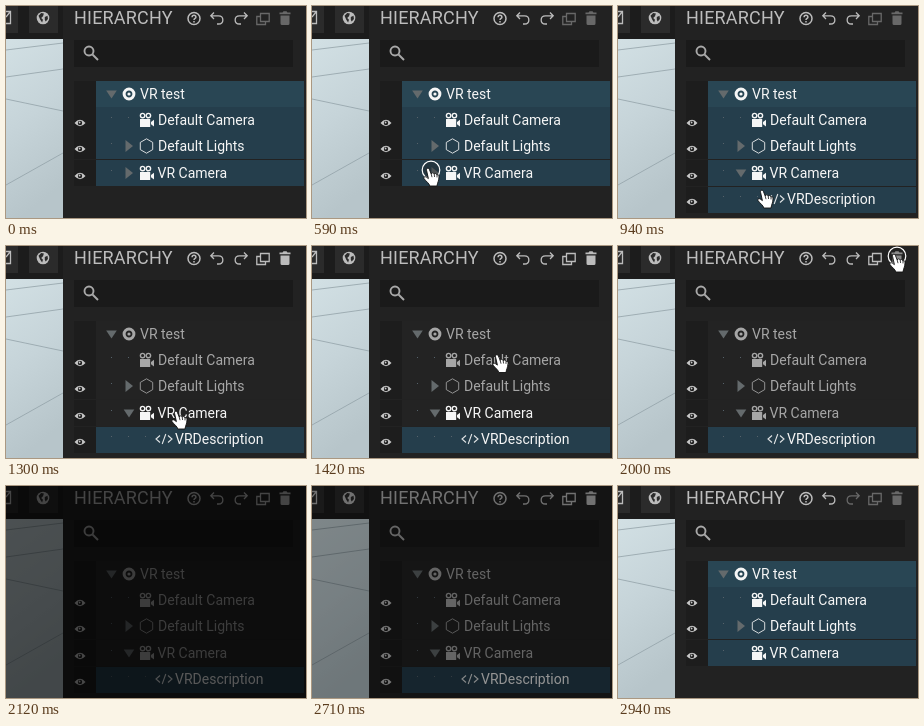
An HTML page that plays this animation: 300 by 212 pixels, repeating every 3040 ms.

```html
<!DOCTYPE html>
<html lang="en">
<head>
<meta charset="utf-8">
<title>Hierarchy panel</title>
<style>
html, body { margin: 0; width: 100%; height: 100%; overflow: hidden; background: #222; }
svg { display: block; }
text { font-family: Roboto, Arial, sans-serif; font-size: 14px; fill: currentColor; }
.title { font-size: 18px; letter-spacing: .2px; color: #bdbdbd; }
.line { fill: none; stroke: currentColor; stroke-width: 1.3; }
.fill { fill: currentColor; }
.tool { color: #bcbcbc; }
.off { color: #686868; }
</style>
</head>
<body>
<svg width="300" height="212" viewBox="0 0 300 212">
  <defs>
    <linearGradient id="sky" x1="0" y1="0" x2=".25" y2="1">
      <stop offset="0" stop-color="#d2e0e4"/>
      <stop offset=".5" stop-color="#c6d4d9"/>
      <stop offset="1" stop-color="#b7c5ca"/>
    </linearGradient>
    <g id="camera">
      <g class="line" style="stroke-width:1.4">
        <circle cx="-3.4" cy="-4.4" r="2.2"/><circle cx="2.4" cy="-4.4" r="2.2"/>
      </g>
      <path class="fill" d="M-6-1H4.2V7H-6ZM5 2L8-.3V6.6L5 4.3Z"/>
    </g>
    <path id="light" class="line" style="stroke-width:1" opacity=".85" d="M0-7.2L6.2-3.6V3.6L0 7.2L-6.2 3.6V-3.6Z"/>
    <g id="root">
      <circle r="4.9" class="line" style="stroke-width:3"/><circle r="1.6" class="fill"/>
    </g>
    <path id="script" class="line" style="stroke-width:1.1" opacity=".9" d="M-4-3.5L-8 0L-4 3.5M1.8-5L-1.8 5M4-3.5L8 0L4 3.5"/>
    <g id="eye">
      <path class="fill" d="M-5.5 0Q0-6.4 5.5 0Q0 6.4-5.5 0Z"/>
      <circle r="2.2" fill="#1d1d1d"/><circle cx="-.4" cy="-.5" r=".9" class="fill"/>
    </g>
    <path id="closed" d="M-3.5-6L4 0L-3.5 6Z"/>
    <path id="open" d="M-5.3-3.5H5.3L0 4.5Z"/>
  </defs>

  <rect width="300" height="212" fill="#222"/>
  <rect width="57" height="33" fill="#1c1c1c"/>
  <path fill="#2b2b2b" d="M0 0H12V27H0ZM23 0H52V27H23Z"/>
  <path d="M0 5.5H4.5V17.5H0M0 11L4 6" class="line tool"/>
  <g transform="translate(37 12) scale(.9)" class="tool">
    <circle r="7" class="fill"/>
    <path fill="#2b2b2b" d="M-5-2.5L-2-5.5L1-5L0-2L-2 0L0 2L-1 5L-3 2ZM2-1L5-2.5L5.5 1L3 4L2 2Z"/>
  </g>
  <rect y="33" width="57" height="179" fill="url(#sky)"/>
  <path fill="none" stroke="#94a3a9" stroke-width=".8" d="M0 44L57 37M0 71L57 63M0 93L57 105M0 179L57 147"/>

  <text x="68" y="18" class="title">HIERARCHY</text>
  <g transform="translate(188 12.5)" class="tool">
    <circle r="6" class="line" style="stroke-width:1.5"/>
    <path class="line" style="stroke-width:1.5" d="M-1.9-1.2C-1.9-3.8 1.9-3.8 1.9-1.2C1.9 0 0 0 0 1.6M0 2.5V3.9"/>
  </g>
  <path id="undo" class="line tool" d="M208 6.5L204.8 9.8L208 13M205 9.8H212.5C218.3 9.8 218.3 18 212.5 18H211"/>
  <path id="redo" class="line tool" d="M238 6.5L241.2 9.8L238 13M241 9.8H233.5C227.7 9.8 227.7 18 233.5 18H235"/>
  <path id="copy" class="line" d="M254.5 7.5H263.2V15.5H254.5ZM254 10.5H250.8V18.5H259.5V16"/>
  <path id="trash" class="fill" d="M273.5 6.5H276.5L277.5 5.2H280.5L281.5 6.5H284.5V8.2H273.5ZM274.5 9.4H283.5V17.5Q283.5 19 282 19H276Q274.5 19 274.5 17.5Z"/>

  <rect x="68" y="34" width="219" height="27" fill="#1a1a1a"/>
  <g class="line" style="color:#a8a8a8;stroke-width:1.9"><circle cx="83" cy="45" r="4.5"/><path d="M86.5 48.5L92 54"/></g>

  <g id="tree"></g>
  <g id="cursor">
    <circle id="ring" cx="1" cy="2" r="8.8" fill="#222" fill-opacity=".3" stroke="#fff" stroke-width="1.2"/>
    <path fill="#fff" stroke="#111" stroke-width=".9" stroke-linejoin="round"
      d="M-3.4 2.6C-4.2.4-1.6-.8-.6 1.4L1.2 6C1.6 4.4 3.8 4.4 4.2 6.2C5 5 6.6 5.4 7 7C8.2 6.2 9.3 7 9 9C8.8 13.5 7.4 14.5 7 18H-.2C-.6 15.4-4 13.4-6 10.6C-6.8 8.8-4.6 8-3 9.6L-1.6 10.6Z"/>
    <path fill="none" stroke="#111" stroke-width=".8" d="M1.2 6L2 9.2M4.2 6.2L4.6 9M7 7V9.4"/>
  </g>
  <rect id="shade" width="300" height="212" fill="#000"/>
</svg>
<script>
const $ = id => document.getElementById(id);
const LOOP = 3040;
const BLUE = '#253e4c', LIGHT_BLUE = '#294654', PLAIN = '#232323';

// label, icon, icon x, text x, arrow x
const rows = [
  ['VR test', 'root', 123, 134, 105.5],
  ['Default Camera', 'camera', 140, 152],
  ['Default Lights', 'light', 140.5, 152, 123],
  ['VR Camera', 'camera', 140, 151.6, 123],
  ['VRDescription', 'script', 158, 169]
];

// time, x, y, click ring
const moves = [
  [0], [120, 110, 191], [240, 112, 184], [360, 116, 172], [470, 118, 164],
  [590, 118, 162, 1], [700, 120, 164], [820, 132, 174], [940, 146, 184],
  [1060, 160, 184], [1180, 165, 184, 1], [1300, 172, 165], [1420, 187, 108.5],
  [1540, 224, 65], [1650, 261, 27], [1770, 278, 10], [1890, 278, 8, 1], [2120]
];

// time, opacity
const shades = [[0, 0], [2120, .64], [2710, .4], [2820, .15], [2940, 0]];

const at = (table, t) => table.findLast(step => step[0] <= t);
const use = (id, x, y, more = '') => `<use href="#${id}" x="${x}" y="${y}" ${more}/>`;

function row([label, icon, iconX, textX, arrowX], i, state) {
  const top = [75, 101, 127, 154, 181][i], mid = top + (i === 4 ? 12 : 13);
  const { expanded, picked, removed, hover } = state;
  const on = !picked || i === 4;
  const color = on || (hover && i === 3) ? '#f6f6f6' : '#a6a6a6';
  const back = !on ? PLAIN : i ? BLUE : LIGHT_BLUE;
  let out = `<rect x="68" y="${top}" width="22" height="26" fill="#1d1d1d"/>` +
    `<rect x="90" y="${top}" width="208" height="26" fill="${back}"/>`;
  if (i) {
    out += use('eye', 74, mid + 3, 'color="#c8c8c8"');
    for (const x of i === 4 ? [105, 122, 139] : [105, 122])
      if (x !== arrowX - 1) out += `<rect x="${x}" y="${mid - 3}" width="1" height="1" fill="#56626a"/>`;
  }
  if (arrowX && !(i === 3 && removed)) {
    const open = i === 0 || (i === 3 && expanded);
    out += use(open ? 'open' : 'closed', arrowX, mid, 'fill="#646a6c"');
  }
  return out + `<g color="${color}">${use(icon, iconX, mid)}` +
    `<text x="${textX}" y="${mid + 5}">${label}</text></g>`;
}

let shown = '';
function drawTree(t) {
  const removed = t >= 2820;
  const state = {
    removed,
    expanded: t >= 700 && !removed,
    picked: t >= 1300 && !removed,
    hover: t < 1540
  };
  const key = JSON.stringify(state);
  if (key === shown) return;
  shown = key;
  $('tree').innerHTML = rows.slice(0, state.expanded ? 5 : 4)
    .map((r, i) => row(r, i, state)).join('');
  for (const id of ['copy', 'trash']) {
    $(id).classList.toggle('off', !state.picked);
    $(id).classList.toggle('tool', state.picked);
  }
  $('redo').classList.toggle('off', removed);
}

function draw(now) {
  const t = now % LOOP;
  drawTree(t);
  const [, x, y, ring] = at(moves, t);
  $('cursor').style.display = x ? '' : 'none';
  $('cursor').setAttribute('transform', `translate(${x || 0} ${y || 0})`);
  $('ring').style.display = ring ? '' : 'none';
  $('shade').setAttribute('opacity', at(shades, t)[1]);
}

let start;
function tick(now) {
  start ??= now;
  draw(now - start);
  requestAnimationFrame(tick);
}
draw(0);
requestAnimationFrame(tick);
</script>
</body>
</html>
```
